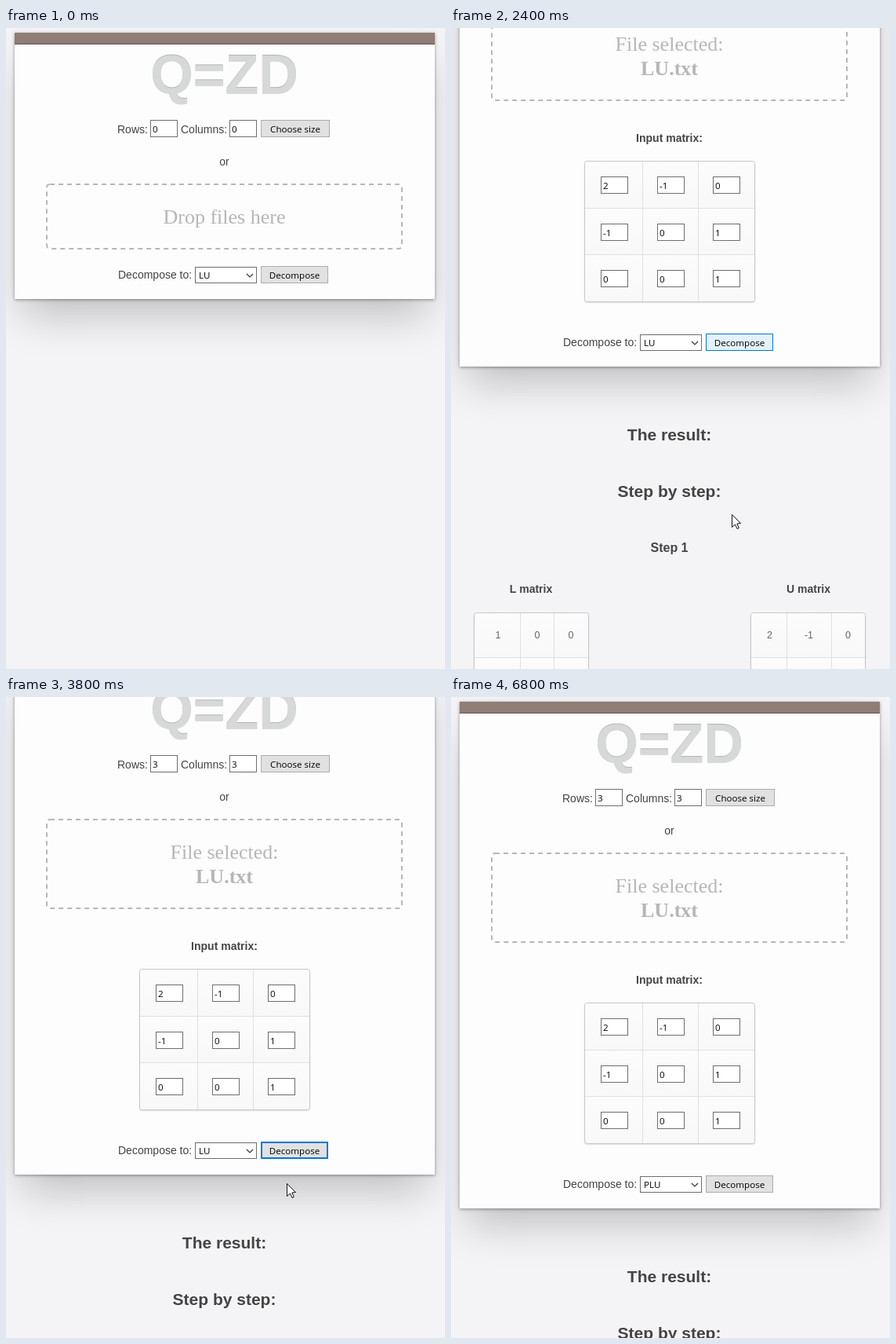
Recreate the animation shown at these times as an HTML page with a canvas. Size 560x816 px, loop 8 s.

```html
<!DOCTYPE html>
<html lang="en">
<head>
<meta charset="utf-8">
<title>Matrix decomposition</title>
<style>
html, body { margin: 0; width: 100%; height: 100%; overflow: hidden; background: #f4f3f6; }
canvas { display: block; width: 560px; height: 816px; }
</style>
</head>
<body>
<canvas id="stage" width="560" height="816"></canvas>
<script>
const W = 560, H = 816, LOOP = 8000, STEP = 200, MID = 278.5;
const ctx = document.getElementById('stage').getContext('2d');

const SANS = '"Liberation Sans", Arial, sans-serif';
const SERIF = '"Liberation Serif", Times, serif';
const UI = '11.6px "Open Sans", "Noto Sans", sans-serif';
const BODY = '14px ' + SANS;
const bold = size => `bold ${size}px ${SANS}`;

const DROP = 1000, RESULT = 2200, OPEN = 5200, CHOSEN = 6400, LEAVE = 6600;
const SCROLL = [0, 220, 430, 570, 640, 640, 597, 325, 43, 0];
const PATH = [
  [400, 550, 330], [1000, 330, 245], [1400, 335, 258], [2000, 358, 619],
  [4000, 358, 619], [5000, 310, 621], [5400, 272, 634], [5800, 262, 654], [LEAVE, 262, 654]
];
const INPUT = [['2', '-1', '0'], ['-1', '0', '1'], ['0', '0', '1']];
const LOWER = [['1', '0', '0'], ['-0.5', '1', '0'], ['0', '0', '1']];
const UPPER = [['2', '-1', '0'], ['0', '-0.5', '1'], ['0', '0', '1']];
const OPTIONS = ['LU', 'PLU', 'LDLt', 'RREF', 'Nullspace'];

function text(str, x, y, font, color, align = 'center') {
  ctx.font = font;
  ctx.fillStyle = color;
  ctx.textAlign = align;
  ctx.fillText(str, x, y);
}

function box(x, y, w, h, fill, stroke) {
  ctx.fillStyle = stroke;
  ctx.fillRect(x, y, w, h);
  ctx.fillStyle = fill;
  ctx.fillRect(x + 1, y + 1, w - 2, h - 2);
}

function shadow(color, blur, dy) {
  ctx.shadowColor = color;
  ctx.shadowBlur = blur;
  ctx.shadowOffsetY = dy;
}

function field(x, y, value) {
  box(x, y, 35, 22, '#fff', '#6e6e6e');
  text(value, x + 3, y + 16, UI, '#000', 'left');
}

function button(x, y, w, label, mode) {
  const looks = {
    plain: ['#e1e1e1', '#adadad'],
    hover: ['#e5f1fb', '#0078d7'],
    down: ['#cce4f7', '#005499'],
    focus: ['#e1e1e1', '#0078d7']
  };
  const [fill, edge] = looks[mode];
  box(x, y, w, 22, fill, edge);
  if (mode === 'focus') {
    ctx.strokeStyle = edge;
    ctx.lineWidth = 2;
    ctx.strokeRect(x + 1, y + 1, w - 2, 20);
  }
  const push = mode === 'down' ? 1 : 0;
  text(label, x + w / 2 + push, y + 16 + push, UI, '#000');
}

// Rounded sheet with soft cells; cols and rows list every edge.
function grid(cols, rows) {
  const x = cols[0], y = rows[0], w = cols[3] - x, h = rows[3] - y;
  ctx.save();
  ctx.beginPath();
  ctx.roundRect(x + .5, y + .5, w - 1, h - 1, 3);
  shadow('rgba(0,0,0,.2)', 2, 1);
  ctx.fillStyle = '#fafafa';
  ctx.fill();
  shadow('transparent', 0, 0);
  ctx.save();
  ctx.clip();
  for (let r = 0; r < 3; r++) {
    const g = ctx.createLinearGradient(0, rows[r], 0, rows[r + 1]);
    g.addColorStop(0, '#fcfcfc');
    g.addColorStop(1, '#f8f8f8');
    ctx.fillStyle = g;
    ctx.fillRect(x, rows[r], w, rows[r + 1] - rows[r]);
  }
  ctx.fillStyle = '#e0e0e0';
  for (let i = 1; i < 3; i++) {
    ctx.fillRect(cols[i], y, 1, h);
    ctx.fillRect(x, rows[i], w, 1);
  }
  ctx.restore();
  ctx.strokeStyle = '#c8c8ca';
  ctx.lineWidth = 1;
  ctx.stroke();
  ctx.restore();
}

function matrix(name, cx, cols, centers, y, values) {
  text(name, cx, y - 25, bold(14), '#444');
  grid(cols, [y, y + 57, y + 112, y + 170]);
  values.forEach((row, r) => row.forEach((v, c) =>
    text(v, centers[c], y + 33 + Math.round(r * 56.2), '12.5px ' + SANS, '#666')));
}

function results() {
  text('The result:', MID, 745, bold(21), '#444');
  text('Step by step:', MID, 817, bold(21), '#444');
  for (let i = 0; i < 2; i++) {
    const y = 964 + i * 281;
    text('Step ' + (i + 1), MID, y - 77, bold(16), '#444');
    matrix('L matrix', 102, [29, 88, 131, 176], [60, 110, 153], y, LOWER);
    matrix('U matrix', 456, [382, 428, 485, 529], [406.5, 456.5, 506.5], y, UPPER);
  }
}

function chevron(y) {
  ctx.beginPath();
  ctx.moveTo(307, y - 2);
  ctx.lineTo(311, y + 2);
  ctx.lineTo(315, y - 2);
  ctx.strokeStyle = '#333';
  ctx.lineWidth = 1.2;
  ctx.stroke();
}

function picker(bottom, value, open) {
  const y = bottom - 41;
  box(241, y, 79, 21, '#fff', open ? '#333' : '#6e6e6e');
  if (open) box(303, y, 17, 21, '#e5f1fb', '#0078d7');
  text(value, 246, y + 15, UI, '#000', 'left');
  chevron(bottom - 30);
}

function menu(active) {
  box(241, 630, 83, 104, '#fff', '#111');
  OPTIONS.forEach((name, i) => {
    const y = 631 + i * 20.4;
    if (i === active) {
      ctx.fillStyle = '#0078d7';
      ctx.fillRect(242, Math.round(y), 81, 20);
    }
    text(name, 248, Math.round(y + 14), UI, i === active ? '#fff' : '#000', 'left');
  });
}

function card(bottom) {
  ctx.save();
  ctx.fillStyle = '#fefdfe';
  shadow('rgba(0,0,0,.22)', 50, 30);
  ctx.fillRect(21, 16, 516, bottom - 26);
  shadow('rgba(0,0,0,.4)', 4, 1);
  ctx.fillRect(11, 6, 536, bottom - 6);
  ctx.restore();
  ctx.fillStyle = '#8f7d76';
  ctx.fillRect(11, 6, 536, 15);
  ctx.fillStyle = '#64534d';
  ctx.fillRect(11, 20, 536, 1);
}

function dropZone(loaded) {
  ctx.save();
  ctx.beginPath();
  ctx.roundRect(52, 199, 453, loaded ? 113 : 82, 4);
  ctx.setLineDash([6, 5]);
  ctx.lineWidth = 2;
  ctx.strokeStyle = '#b7b6b9';
  ctx.stroke();
  ctx.restore();
  text(loaded ? 'File selected:' : 'Drop files here', MID, 249, '26px ' + SERIF, '#b6b6b8');
  if (loaded) text('LU.txt', MID, 280, 'bold 26px ' + SERIF, '#b6b6b8');
}

function inputMatrix() {
  text('Input matrix:', MID, 365, bold(14), '#444');
  grid([170, 244, 315, 388], [389, 449, 508, 569]);
  INPUT.forEach((row, r) => row.forEach((v, c) =>
    field(191 + Math.round(c * 71.5), 409 + Math.round(r * 59.6), v)));
}

function buttonMode(t) {
  if (t === 2000) return 'down';
  if (t >= 1800 && t < 2600) return 'hover';
  return t >= 2600 && t < 4800 ? 'focus' : 'plain';
}

function cursor(t) {
  const i = PATH.findIndex(p => p[0] > t);
  if (i < 1) return;
  const [a, b] = [PATH[i - 1], PATH[i]];
  const k = (t - a[0]) / (b[0] - a[0]);
  ctx.save();
  ctx.translate(Math.round(a[1] + (b[1] - a[1]) * k) + .5, Math.round(a[2] + (b[2] - a[2]) * k) + .5);
  ctx.beginPath();
  [[0, 0], [0, 16], [4, 12.5], [6.5, 18], [8.8, 17], [6.3, 11.5], [11, 11]]
    .forEach(p => ctx.lineTo(...p));
  ctx.closePath();
  ctx.fillStyle = '#fff';
  ctx.fill();
  ctx.strokeStyle = '#111';
  ctx.lineWidth = 1;
  ctx.stroke();
  ctx.restore();
}

function draw(t) {
  const loaded = t >= DROP, open = t >= OPEN && t < CHOSEN;
  const bottom = loaded ? 651 : 345, size = loaded ? '3' : '0';
  ctx.fillStyle = '#f4f3f6';
  ctx.fillRect(0, 0, W, H);
  ctx.save();
  ctx.translate(0, -(SCROLL[(t - RESULT) / STEP] || 0));

  card(bottom);
  text('Q=ZD', MID, 83, bold(70), '#b4b6b5');
  text('Q=ZD', MID, 84, bold(70), '#d7d9d8');
  text('Rows:', 142, 134, BODY, '#444', 'left');
  field(184, 117, size);
  text('Columns:', 223, 134, BODY, '#444', 'left');
  field(285, 117, size);
  button(325, 117, 88, 'Choose size', 'plain');
  text('or', MID, 175, BODY, '#444');
  dropZone(loaded);
  if (loaded) inputMatrix();
  if (t >= RESULT) results();

  text('Decompose to:', 143, bottom - 26, BODY, '#444', 'left');
  picker(bottom, t >= CHOSEN ? 'PLU' : 'LU', open);
  button(325, bottom - 42, 86, 'Decompose', buttonMode(t));
  if (open) menu(t >= 5800 ? 1 : 0);
  ctx.restore();
  cursor(t);
}

let last = -1;
const start = performance.now();
function tick() {
  const t = Math.floor((performance.now() - start) % LOOP / STEP) * STEP;
  if (t !== last) draw(last = t);
  requestAnimationFrame(tick);
}
tick();
</script>
</body>
</html>
```
